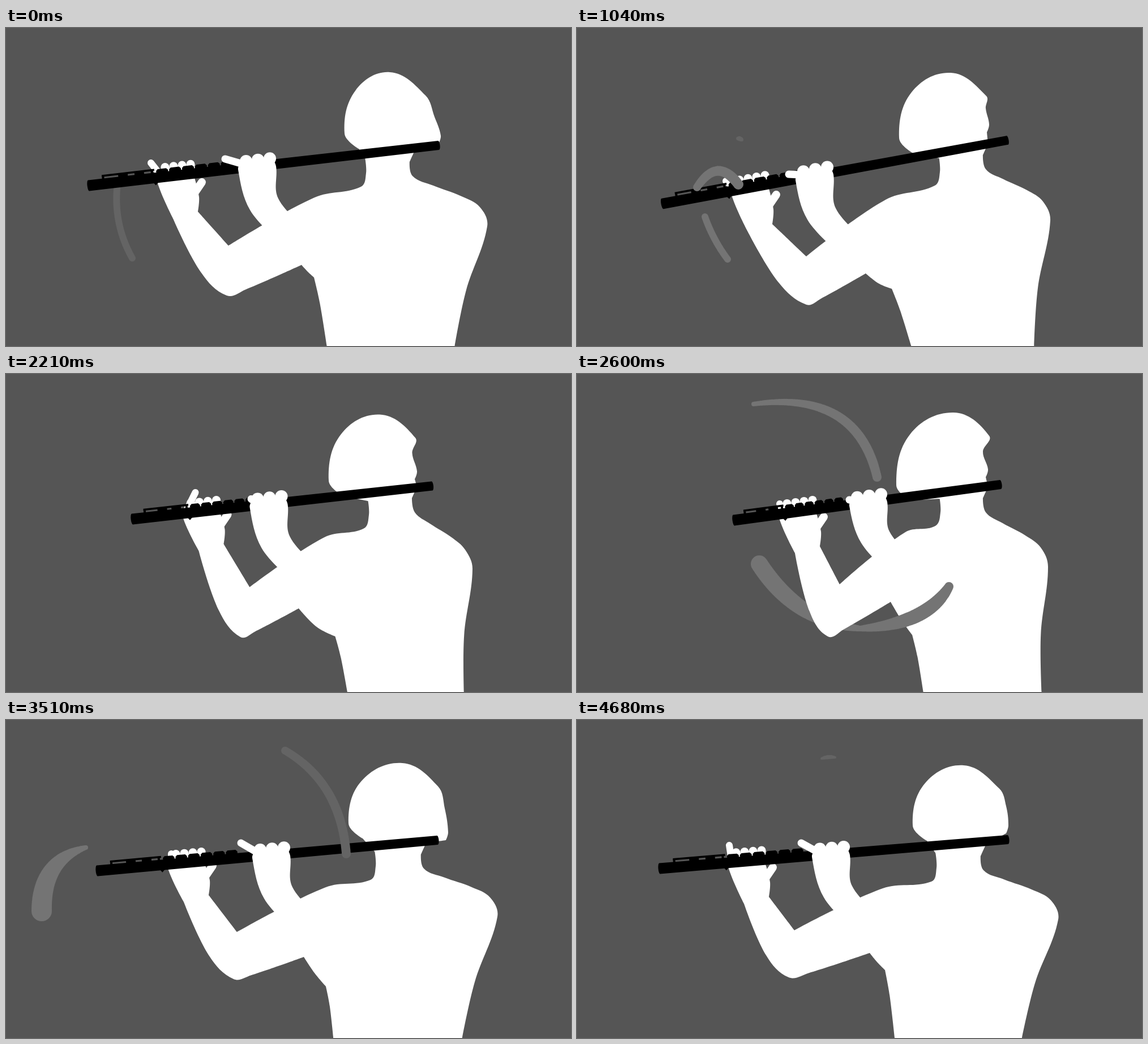
Animation of 998x561 px, one loop 4.81 s. Source, as an HTML page with a canvas:

```html
<!DOCTYPE html>
<html lang="en">
<head>
<meta charset="utf-8">
<title>Flute player</title>
<style>
  html, body { margin: 0; width: 100%; height: 100%; overflow: hidden; background: #555; }
  canvas { display: block; }
</style>
</head>
<body>
<canvas id="stage" width="998" height="561"></canvas>
<script>
const ctx = document.getElementById('stage').getContext('2d');
const LOOP = 4810, STEP = 130;
const DIM = '#646464', PALE = '#747474';

// The joints pass through one position per key time; everything else is derived from them.
const keyTimes = [0, 1040, 1820, 2600, 3510, 4160, 4680];
const joints = {
  tail: '146,278 151,310 169,254 277,258 161,266 134,297 146,262',
  mouth: '764,207 760,198 757,200 748,195 762,212 733,201 761,211',
  crown: '678,78 660,79 655,75 665,68 700,76 640,77 683,80',
  hairL: '598,186 569,194 576,180 564,196 605,182 560,182 593,186',
  brow: '757,157 722,142 718,142 717,137 775,156 724,158 758,152',
  hairR: '768,190 728,170 726,175 726,168 781,198 731,181 762,186',
  neckL: '636,256 641,254 640,253 642,244 653,258 621,256 635,261',
  neckR: '718,261 722,249 722,244 722,244 738,262 705,251 718,265',
  shoulderL: '545,299 545,303 545,297 580,279 565,295 525,303 540,297',
  shoulderR: '850,350 836,340 816,348 832,340 868,347 812,340 850,352',
  crook: '393,384 405,403 397,381 464,371 408,374 384,399 384,371',
  elbow: '390,472 405,488 385,465 443,463 402,457 382,483 374,454',
  wrist: '317,330 323,352 318,302 407,310 336,315 305,345 317,318',
  pinky: '256,238 263,270 311,189 358,229 292,236 267,244 269,221',
  armpit: '522,418 510,433 480,425 554,402 526,418 484,432 517,411',
  waist: '544,440 556,460 571,466 592,460 565,470 540,462 544,441',
  hipL: '568,570 593,570 596,570 613,570 579,570 573,570 562,570',
  hipR: '791,570 807,570 797,570 821,570 804,570 786,570 784,570',
  nearWrist: '456,311 432,328 426,306 527,288 481,305 410,325 461,303',
  thumb: '387,231 374,258 385,219 481,222 415,217 364,250 396,217'
};
const parse = text => text.split(' ').map(item => item.split(',').map(Number));
for (const name in joints) joints[name] = parse(joints[name]);

const move = ([x, y], dx, dy) => [x + dx, y + dy];
const mix = (a, b, k) => a.map((v, i) => v + (b[i] - v) * k);
const sharp = ([x, y]) => [x, y, true];

function poseAt(now) {
  const i = keyTimes.findLastIndex(t => t <= now);
  const u = (now - keyTimes[i]) / ((keyTimes[i + 1] || LOOP) - keyTimes[i]);
  const k = u * u * (3 - 2 * u), pose = {};
  for (const name in joints) {
    const track = joints[name];
    pose[name] = mix(track[i], track[(i + 1) % track.length], k);
  }
  const { tail, mouth } = pose;
  const slope = (mouth[1] - tail[1]) / (mouth[0] - tail[0]);
  pose.onFlute = (x, dy) => [x, tail[1] + (x - tail[0]) * slope + dy];
  return pose;
}

// Closed white shape, smooth except at points marked sharp.
function blob(points) {
  const n = points.length, at = i => points[(i + n) % n];
  const control = (i, reach) => {
    const [x, y, corner] = at(i);
    if (corner) return [x, y];
    const a = at(i - 1), b = at(i + 1), dx = b[0] - a[0], dy = b[1] - a[1];
    const scale = .36 * reach / (Math.hypot(dx, dy) || 1);
    return [x + dx * scale, y + dy * scale];
  };
  ctx.beginPath();
  ctx.moveTo(at(0)[0], at(0)[1]);
  for (let i = 0; i < n; i++) {
    const p = at(i), q = at(i + 1), reach = Math.hypot(q[0] - p[0], q[1] - p[1]);
    ctx.bezierCurveTo(...control(i, reach), ...control(i + 1, -reach), q[0], q[1]);
  }
  ctx.fillStyle = '#fff';
  ctx.fill();
}

function capsule(a, b, width) {
  ctx.beginPath();
  ctx.moveTo(...a);
  ctx.lineTo(...b);
  ctx.lineCap = 'round';
  ctx.lineWidth = width;
  ctx.strokeStyle = '#fff';
  ctx.stroke();
}

function drawBody({ neckL, neckR, shoulderL, shoulderR, crook, elbow, wrist, armpit, waist, hipL, hipR }) {
  const wristL = move(wrist, -22, 6), wristR = move(wrist, 22, -6);
  const deltoid = move(shoulderR, -13, -34);
  const sag = (waist[0] - armpit[0]) ** 2 / 500;
  blob([
    sharp(move(neckL, -2, -28)), neckL, move(neckL, -9, 24), shoulderL,
    sharp(crook), sharp(wristR), sharp(wristL),
    move(mix(elbow, wristL, .35), -12, 7), elbow, move(mix(elbow, armpit, .25), 0, 3),
    sharp(armpit), move(mix(armpit, waist, .5), 0, sag), sharp(waist),
    move(mix(waist, hipL, .35), 2, 0), sharp(hipL), sharp(hipR),
    move(mix(hipR, shoulderR, .48), -7, 0), shoulderR, deltoid,
    move(mix(neckR, deltoid, .72), 0, -4), mix(neckR, deltoid, .31), neckR,
    sharp(move(neckR, -5, -27))
  ]);
}

function drawHead({ crown, hairL, hairR, brow, neckL, neckR }) {
  const temple = [mix(hairL, crown, .24)[0], mix(hairL, crown, .7)[1]];
  blob([
    sharp(move(neckL, 0, -24)), sharp(move(hairL, 25, 27)), hairL, temple, crown,
    move(crown, 63, 41), brow, hairR, sharp(move(hairR, -4, 14)),
    sharp(move(neckR, 4, -45)), sharp(move(neckR, -5, -25))
  ]);
}

function drawFarHand({ wrist, pinky, onFlute }) {
  const x = wrist[0];
  blob([
    sharp(move(wrist, -22, 6)), onFlute(x - 50, 7), sharp(onFlute(x - 46, -10)),
    sharp(onFlute(x + 14, -10)), sharp(onFlute(x + 16, 8)), move(wrist, 24, -32),
    sharp(move(wrist, 22, -6)), sharp(move(wrist, 18, 35))
  ]);
  capsule(pinky, onFlute(x - 44, -4), 12);
  for (let i = 0; i < 4; i++) capsule(onFlute(x - 36 + 15 * i, -17), onFlute(x - 36 + 15 * i, 0), 15);
  capsule(move(wrist, 29, -58), move(wrist, 14, -36), 14);
}

function drawNearHand({ nearWrist, thumb, onFlute }) {
  const x = nearWrist[0], left = move(nearWrist, -25, 10), right = move(nearWrist, 25, -10);
  blob([
    left, onFlute(x - 46, 2), sharp(onFlute(x - 40, -12)), sharp(onFlute(x + 14, -12)),
    onFlute(x + 21, 4), right, sharp(move(right, 50, 54)), sharp(move(left, 50, 54))
  ]);
  for (let i = 0; i < 3; i++) {
    const knuckle = onFlute(x + 10 - 21 * i, -11);
    capsule(knuckle, knuckle, 22);
  }
  capsule(thumb, onFlute(x - 36, -6), 13);
}

function polygon(...points) {
  ctx.beginPath();
  points.forEach(p => ctx.lineTo(...p));
  ctx.fill();
}

function drawFlute({ tail, mouth }) {
  const dx = mouth[0] - tail[0], dy = mouth[1] - tail[1], length = Math.hypot(dx, dy);
  ctx.save();
  ctx.translate(...tail);
  ctx.rotate(Math.atan2(dy, dx));
  ctx.fillStyle = '#000';
  polygon([0, -9.5], [length, -8], [length, 8], [0, 9.5]);
  for (const [x, r] of [[0, 9.5], [length, 8]]) {
    ctx.beginPath();
    ctx.ellipse(x, 0, 2.5, r, 0, 0, 7);
    ctx.fill();
  }
  // key rail on four posts, then a row of finger keys
  const rail = length * .15, start = length * .04;
  ctx.fillRect(start, -16, rail, 3.5);
  for (let i = 0; i < 4; i++) ctx.fillRect(start + rail * i * .31, -14, i % 3 ? 17 : 4, 6);
  const pitch = length * .037, width = pitch - 2;
  for (let i = 0; i < 6; i++) {
    const x = length * .195 + i * pitch;
    polygon([x, -8], [x, -12], [x + 3, -15], [x + width - 3, -15], [x + width, -12], [x + width, -8]);
  }
  polygon([start + rail - 4, 8], [start + rail + 5, 8], [start + rail, 13]);
  ctx.restore();
}

// Ribbons of air: start, control and end of a quadratic curve, each x,y,radius.
// A ribbon grows until `time` and then retracts from its start.
const ribbon = (time, front, color, curve, rise = 390, fall = 390) =>
  ({ time, front, color, curve: parse(curve), rise, fall });
const ribbons = [
  ribbon(0, false, DIM, '196,284,6 191,349,6 223,406,6', 130, 520),
  ribbon(1040, true, PALE, '212,281,7 248,226,9 285,276,9'),
  ribbon(1040, false, PALE, '226,333,6 240,373,6 266,408,6'),
  ribbon(1040, false, DIM, '284,195,3 288,195,5 291,197,3'),
  ribbon(1820, true, DIM, '428,75,1 700,52,32 581,299,3'),
  ribbon(1820, false, PALE, '452,255,4 466,318,11 507,321,2'),
  ribbon(2600, false, PALE, '312,53,4 495,28,10 530,182,8'),
  ribbon(2600, false, PALE, '322,335,15 389,438,16 500,449,5'),
  ribbon(2600, true, PALE, '500,449,5 618,442,18 657,375,8'),
  ribbon(3120, false, DIM, '330,52,5 470,10,9 540,85,8'),
  ribbon(3510, false, PALE, '141,225,4 62,247,17 63,337,18'),
  ribbon(3510, true, DIM, '493,54,7 591,111,8 601,236,8'),
  ribbon(4160, false, DIM, '320,127,5 422,99,10 456,183,6'),
  ribbon(4160, false, PALE, '258,180,7 246,196,11 240,215,8'),
  ribbon(4680, false, DIM, '432,68,2 444,64,5 456,66,2', 260, 130)
];

function drawRibbons(now, front) {
  for (const { time, color, curve: [a, b, c], rise, fall } of ribbons.filter(r => r.front === front)) {
    const age = (now - time + LOOP * 1.5) % LOOP - LOOP / 2;
    const start = Math.max(0, age / fall), end = Math.min(1, 1 + age / rise);
    if (start >= end) continue;
    ctx.beginPath();
    for (let i = 0; i <= 140; i++) {
      const u = start + (end - start) * i / 140;
      const [x, y, radius] = mix(mix(a, b, u), mix(b, c, u), u);
      ctx.moveTo(x, y);
      ctx.arc(x, y, radius, 0, 2 * Math.PI);
    }
    ctx.fillStyle = color;
    ctx.fill();
  }
}

function draw() {
  const now = Math.floor(performance.now() % LOOP / STEP) * STEP;
  const pose = poseAt(now);
  ctx.fillStyle = '#555';
  ctx.fillRect(0, 0, 998, 561);
  drawRibbons(now, false);
  drawBody(pose);
  drawHead(pose);
  drawFarHand(pose);
  drawFlute(pose);
  drawNearHand(pose);
  drawRibbons(now, true);
  requestAnimationFrame(draw);
}
draw();
</script>
</body>
</html>
```
